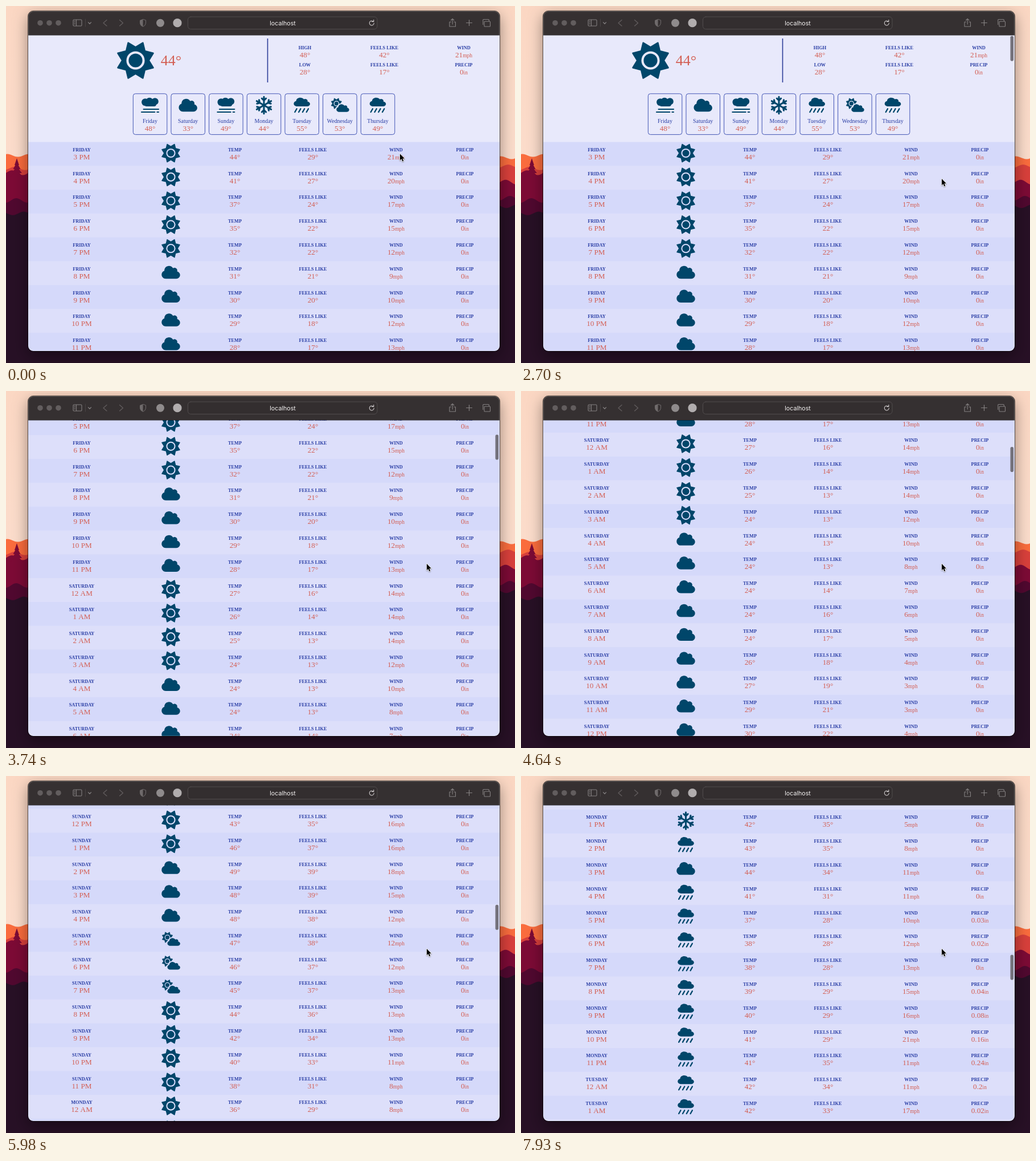
Recreate the animation shown at these times as an HTML page with a canvas. Size 894x626 px, loop 8 s.

```html
<!DOCTYPE html>
<html>
<head>
<meta charset="utf-8">
<style>
html, body { margin: 0; width: 100%; height: 100%; overflow: hidden; background: #271025; }
canvas { display: block; }
</style>
</head>
<body>
<canvas id="stage" width="894" height="626"></canvas>
<script>
const c = document.getElementById('stage').getContext('2d');
const LABEL = '#2a3ea5', VALUE = '#d35f54', ICON = '#00466a', PAGE = '#e8e9fb', GREY = '#848081';
const BANDS = ['#d5d9fa', '#dddffa'];
const SERIF = '"Liberation Serif", "Times New Roman", serif';
const LOOP = 8000, PITCH = 41.79, FIRST = 238.5;
const DAYS = ['Friday', 'Saturday', 'Sunday', 'Monday', 'Tuesday', 'Wednesday', 'Thursday'];

// Turns "at:value" key points into a function that runs straight between them
function track(keys) {
  const pts = keys.split(' ').map(k => k.split(':').map(Number));
  return x => {
    const n = pts.findIndex(p => p[0] > x);
    if (n < 1) return pts.at(n)[1];
    const [[x0, y0], [x1, y1]] = [pts[n - 1], pts[n]];
    return y0 + (y1 - y0) * (x - x0) / (x1 - x0);
  };
}

// Forecast by hours since Friday 3 PM
const temp = track('0:44 2:37 4:32 12:24 17:24 21:30 36:27 45:43 47:49 51:46 53:44 57:36 62:31 64:31 67:40 72:44 74:37 81:42');
const feel = track('0:29 3:22 5:21 8:17 11:13 14:13 21:22 36:18 47:39 53:36 57:29 62:23 64:24 69:36 72:34 74:28 79:29 80:35 82:33');
const wind = track('0:21 1:20 5:9 9:14 11:14 14:8 19:3 46:16 47:18 49:12 54:13 56:8 64:4 70:5 72:11 74:10 78:16 79:21 80:11 81:11 82:17');
const rain = track('73:0 74:.03 76:0 78:.08 80:.24 81:.2 82:.02');
const icons = 's5c4s4c20s14c3p3s12c5n1r1c1r11'.replace(/(\w)(\d+)/g, (m, k, n) => k.repeat(n));

function text(str, x, y, font, color, align = 'center') {
  c.font = font;
  c.fillStyle = color;
  c.textAlign = align;
  c.fillText(str, x, y);
}

function disc(x, y, r, color) {
  c.fillStyle = color;
  c.beginPath();
  c.arc(x, y, r, 0, 7);
  c.fill();
}

function stroke(d, color, width) {
  c.strokeStyle = color;
  c.lineWidth = width;
  c.stroke(new Path2D(d));
}

function box(x, y, w, h, r) {
  c.beginPath();
  c.roundRect(x, y, w, h, r);
}

// Caption over a number with an optional small unit
function stat(label, value, unit, x, y) {
  text(label, x, y, 'bold 8.3px ' + SERIF, LABEL);
  const big = '13.2px ' + SERIF, small = '9.5px ' + SERIF;
  c.font = big;
  const w = c.measureText(value).width;
  c.font = small;
  const left = x - (w + c.measureText(unit).width) / 2;
  text(value, left, y + 14, big, VALUE, 'left');
  text(unit, left + w, y + 14, small, VALUE, 'left');
}

const cloudPath = new Path2D('M538 227c4-11 6-22 6-35 0-53-43-96-96-96-20 0-38 6-53 16' +
  'C367 64 315 32 256 32c-88 0-160 72-160 160v8C40 220 0 273 0 336c0 80 64 144 144 144h368' +
  'c71 0 128-57 128-128 0-62-44-114-102-125z');

function cloud(x, y, w, h, gap) {
  c.save();
  c.translate(x, y);
  c.scale(w / 640, h / 448);
  c.translate(-320, -256);
  if (gap) {
    c.strokeStyle = gap;
    c.lineWidth = 120;
    c.stroke(cloudPath);
  }
  c.fillStyle = ICON;
  c.fill(cloudPath);
  c.restore();
}

function sun(x, y, r, bg) {
  c.fillStyle = c.strokeStyle = ICON;
  c.lineWidth = r * 0.08;
  c.lineJoin = 'round';
  c.beginPath();
  for (let i = 0; i < 16; i++) {
    const a = (i + 1) * Math.PI / 8, d = r * (i % 2 ? 0.69 : 1);
    c.lineTo(x + d * Math.cos(a), y + d * Math.sin(a));
  }
  c.closePath();
  c.fill();
  c.stroke();
  disc(x, y, r * 0.48, bg);
  disc(x, y, r * 0.36, ICON);
}

function icon(kind, x, y, bg) {
  if (kind === 's') sun(x, y, 16.9, bg);
  if (kind === 'c') cloud(x, y, 32.4, 22.4);
  if (kind === 'p') {
    sun(x - 6, y - 3, 9.9, bg);
    cloud(x + 5.2, y + 5, 22.4, 13.5, bg);
  }
  c.save();
  c.translate(x, y);
  c.lineCap = 'round';
  if (kind === 'r') {
    cloud(0, -5.6, 28.6, 15.4);
    for (let i = 0; i < 4; i++) stroke(`M${-9 + i * 6.8} 6.200l-3.300 5.800`, ICON, 2.3);
  }
  if (kind === 'n') {
    for (let i = 0; i < 6; i++) {
      stroke('M0 0V-14.700M-3.700-12L0-8.300L3.700-12', ICON, 3);
      c.rotate(Math.PI / 3);
    }
  }
  if (kind === 'f') {
    disc(-8.5, -5.4, 6.4, ICON);
    disc(-1, -6, 7.2, ICON);
    disc(8.6, -6.6, 6.2, ICON);
    box(-10, -6, 21, 8, 4);
    c.fill();
    stroke('M-11.4 7H15M-15 12H8.3M12.4 12H15', ICON, 2.1);
  }
  c.restore();
}

function summary(dy) {
  sun(227.5, 95.5 - dy, 33.5, PAGE);
  text('44°', 290, 104 - dy, '26px ' + SERIF, VALUE);
  c.fillStyle = '#2b3c98';
  c.fillRect(458.7, 57 - dy, 1.6, 77);
  [['HIGH', '48°', ''], ['FEELS LIKE', '42°', ''], ['WIND', '21', 'mph'],
   ['LOW', '28°', ''], ['FEELS LIKE', '17°', ''], ['PRECIP', '0', 'in']].forEach((s, i) =>
    stat(...s, 525 + i % 3 * 139.5, 75.8 + (i > 2) * 30.6 - dy));
  [48, 33, 49, 44, 55, 53, 49].forEach((deg, i) => {
    const x = 223.3 + i * 66.67;
    box(x, 153.8 - dy, 59.5, 71.6, 4);
    c.strokeStyle = '#4356b5';
    c.lineWidth = 1;
    c.stroke();
    icon('fcfnrpr'[i], x + 29.7, 174 - dy, PAGE);
    text(DAYS[i], x + 29.7, 205 - dy, '9.9px ' + SERIF, LABEL);
    text(deg + '°', x + 29.7, 218.8 - dy, '13.2px ' + SERIF, VALUE);
  });
}

function hourRow(i, y) {
  const hour = 15 + i, bg = BANDS[i % 2];
  c.fillStyle = bg;
  c.fillRect(39, y, 829, PITCH + 0.5);
  const clock = (hour % 12 || 12) + (hour % 24 < 12 ? ' AM' : ' PM');
  const base = y + 16.4;
  stat(DAYS[Math.floor(hour / 24)].toUpperCase(), clock, '', 133, base);
  icon(icons[i], 289.5, y + 19.5, bg);
  stat('TEMP', Math.round(temp(i)) + '°', '', 402, base);
  stat('FEELS LIKE', Math.round(feel(i)) + '°', '', 539, base);
  stat('WIND', Math.round(wind(i)), 'mph', 685, base);
  stat('PRECIP', Math.round(rain(i) * 100) / 100, 'in', 806, base);
}

// A wavy hill line from the left edge to the right, filled to the bottom
function ridge(color, left, right, wave) {
  c.fillStyle = color;
  c.beginPath();
  c.moveTo(0, 626);
  for (let x = 0; x <= 894; x += 3) c.lineTo(x, left + (right - left) * x / 894 + wave * Math.sin(x / 6 + left));
  c.lineTo(894, 626);
  c.fill();
}

function desktop() {
  const sky = c.createLinearGradient(0, 0, 0, 270);
  sky.addColorStop(0, '#fbd7c3');
  sky.addColorStop(1, '#fbdccb');
  c.fillStyle = sky;
  c.fillRect(0, 0, 894, 626);
  ridge('#fa6c3d', 262, 266, 2.5);
  ridge('#d8403b', 285, 281, 3);
  ridge('#7c0a35', 292, 309, 4);
  c.beginPath();
  for (let i = 0; i < 4; i++) {
    const y = 267 + i * 7, w = 4 + i * 2.5;
    c.moveTo(19, y);
    c.lineTo(19 + w, y + 12);
    c.lineTo(19 - w, y + 12);
  }
  c.fill();
  ridge('#50082f', 341, 337, 4);
  ridge('#271025', 364, 351, 3);
  c.save();
  c.shadowColor = 'rgba(0,0,0,.42)';
  c.shadowBlur = 26;
  c.shadowOffsetY = 8;
  c.fillStyle = '#353031';
  box(39, 9, 828, 596, 9);
  c.fill();
  c.restore();
}

function toolbar() {
  c.fillStyle = '#353031';
  c.fillRect(39, 9, 829, 42);
  c.fillStyle = 'rgba(0,0,0,.5)';
  c.fillRect(39, 51, 829, 0.8);
  [60, 76, 92].forEach(x => disc(x, 29.7, 4.8, '#625d5e'));
  c.lineCap = c.lineJoin = 'round';
  stroke('M119.5 24h12q1.5 0 1.5 1.5v8q0 1.5-1.5 1.5h-12q-1.5 0-1.5-1.5v-8q0-1.5 1.5-1.5M123.5 24v11' +
    'M120 26.5h1.5M120 29h1.5M120 31.5h1.5', GREY, 1.1);
  stroke('M139.5 23v13', '#484344', 1);
  stroke('M144.5 28.6l2.5 2.6 2.5-2.6', GREY, 1.3);
  stroke('M177 24.5l-6 5.2 6 5.2M199.5 24.5l6 5.2-6 5.2', '#615c5d', 1.3);
  const half = 'M240.5 23.5l-5 1.8v4.7q0 4 5 6.3';
  stroke(half + 'q5-2.3 5-6.3v-4.7z', '#6f6a6b', 1);
  c.fillStyle = '#6f6a6b';
  c.fill(new Path2D(half));
  disc(271, 29.7, 7, '#8f8b8c');
  disc(301, 29.7, 7.6, '#b1adae');
  box(319.5, 19, 332.5, 21.5, 5);
  c.fillStyle = '#332e2f';
  c.fill();
  c.strokeStyle = '#514c4d';
  c.lineWidth = 1;
  c.stroke();
  text('localhost', 486, 33.6, '10.7px Inter, Roboto, sans-serif', '#f4f2f2');
  stroke('M645.3 27.3a4 4 0 1 0 1 2.7M642.5 27.5h3.3v-3.3', '#d0cccd', 1.1);
  stroke('M781.5 28h-2.5v8h10.5v-8h-2.5M784.2 32v-9.5M781.5 25l2.7-2.7 2.7 2.7', GREY, 1.1);
  stroke('M808.5 29.5h10M813.5 24.5v10', GREY, 1.2);
  stroke('M841 27h8.5q1 0 1 1v7q0 1-1 1h-8.5q-1 0-1-1v-7q0-1 1-1M837.8 32.5v-8q0-1 1-1h8.5q1 0 1 1V27', GREY, 1.1);
}

function step(t) {
  const start = t < 2840 ? 2700 : t < 5980 ? 2840 : 5980;
  return start + 150 * Math.floor((t - start) / 150);
}

const drag = track('2700:0 3740:286.5 4640:541.6 4825:594');

// A slow drag, then a flick that dies away
function scrollAt(t) {
  const flick = 2061.5 + 1510.1 * (1 - Math.exp(-0.602 * (t - 5980) / 1000));
  return t < 4825 ? drag(t) : flick;
}

const cursorX = track('0:692 5:771 7:739'), cursorY = track('0:259.3 4:181 7:276 8:303');

function cursor(t) {
  const k = Math.max(0, Math.floor((t - 1050) / 150));
  c.save();
  c.translate(cursorX(k), cursorY(k));
  const arrow = new Path2D('M0 0V11.2L2.6 9L4.4 13.2L6.3 12.4L4.6 8.2H8Z');
  c.shadowColor = 'rgba(0,0,0,.35)';
  c.shadowBlur = 2;
  c.shadowOffsetY = 1;
  c.lineJoin = 'round';
  c.strokeStyle = '#fff';
  c.lineWidth = 1.6;
  c.stroke(arrow);
  c.shadowColor = 'transparent';
  c.fillStyle = '#000';
  c.fill(arrow);
  c.restore();
}

function draw(now) {
  const t = now % LOOP;
  const dy = scrollAt(step(t));
  desktop();
  c.save();
  box(39, 9, 828, 596, 9);
  c.clip();
  c.fillStyle = PAGE;
  c.fillRect(39, 51, 829, 555);
  if (dy < 240) summary(dy);
  for (let i = 0; i < icons.length; i++) {
    const y = FIRST + i * PITCH - dy;
    if (y > 0 && y < 610) hourRow(i, y);
  }
  if (t >= 2700) {
    box(859.5, 52.5 + dy * 0.0841, 5.6, 44, 2.8);
    c.fillStyle = '#74727c';
    c.fill();
  }
  toolbar();
  c.restore();
  c.lineWidth = 1;
  c.strokeStyle = 'rgba(255,255,255,.2)';
  box(39.5, 9.5, 827, 595, 9);
  c.stroke();
  c.strokeStyle = 'rgba(0,0,0,.6)';
  box(38.5, 8.5, 829, 597, 9.5);
  c.stroke();
  cursor(t);
}

const begin = performance.now();
(function frame() {
  draw(performance.now() - begin);
  requestAnimationFrame(frame);
})();
</script>
</body>
</html>
```
